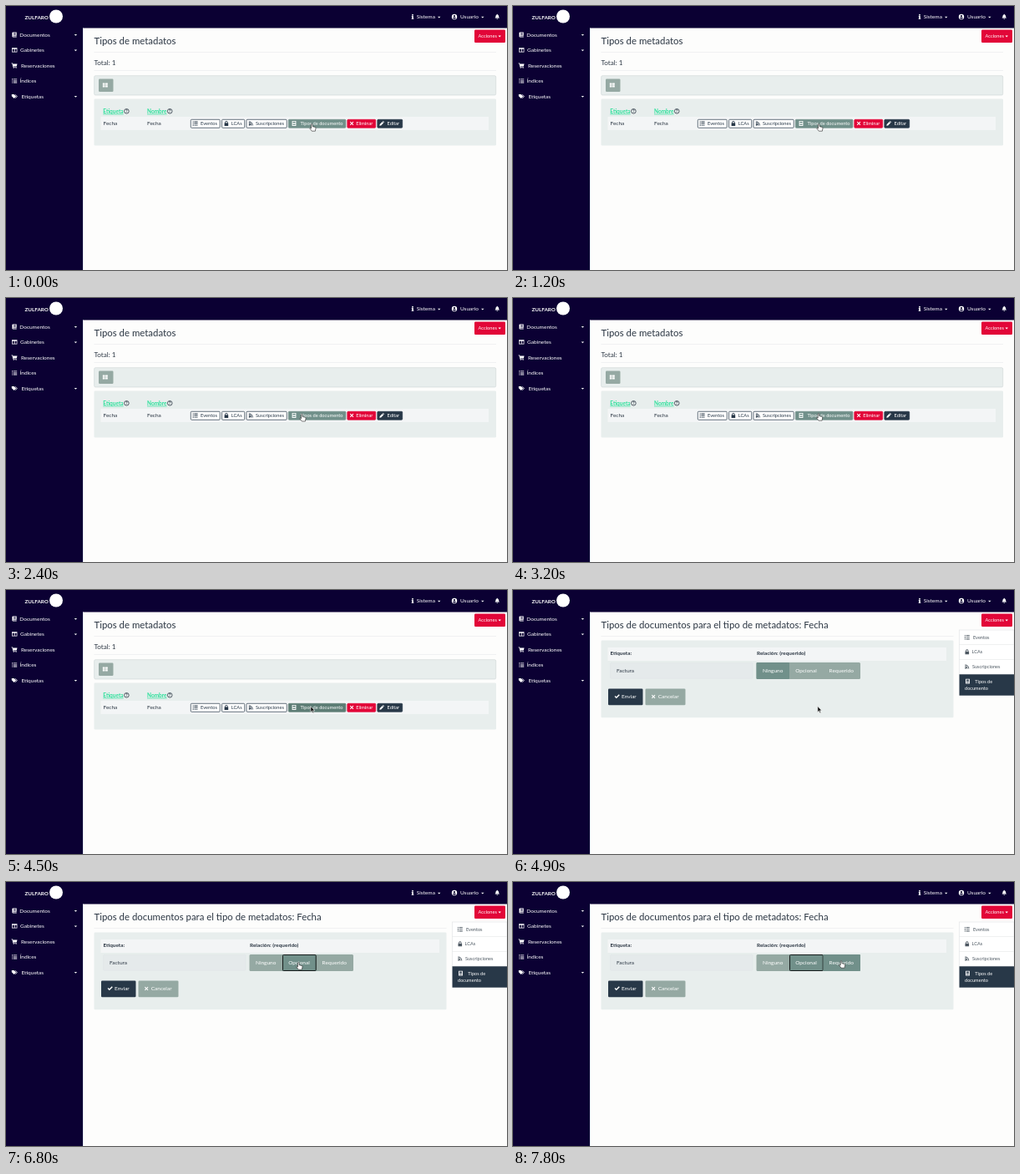
An HTML page for the animation above (8000 ms loop, 600 by 317 pixels).

```html
<!DOCTYPE html>
<html lang="es">
<head>
<meta charset="utf-8">
<style>
html, body { margin: 0; width: 100%; height: 100%; overflow: hidden; background: #fdfdfc; }
svg { display: block; width: 600px; height: 317px; font: 6.5px Lato, sans-serif; }
text { white-space: pre; }
</style>
</head>
<body>
<svg id="stage" viewBox="0 0 600 317"></svg>
<script>
const NAVY = '#0b0033', INK = '#2b3643', DARK = '#283848', RED = '#e20638',
  GREY = '#95a9a3', HOVER = '#71908a', PRESSED = '#5d7d75',
  PANEL = '#e8eeed', STRIP = '#f3f5f6', GREEN = '#2be09a';

// Icon paths are centred on 0,0 and about 6 px wide.
const icons = {
  list: 'M-3-2.6h1.1v1.1h-1.1zM-3-.5h1.1v1.1h-1.1zM-3 1.6h1.1v1.1h-1.1zM-1.2-2.5h4.2v.9h-4.2zM-1.2-.4h4.2v.9h-4.2zM-1.2 1.7h4.2v.9h-4.2z',
  lock: 'M-2.3-.4h.6v-1a1.7 1.7 0 0 1 3.4 0v1h.6v3.3h-4.6zM-.8-.4h1.6v-1a.8.8 0 0 0-1.6 0z',
  rss: 'M-2.5 1.7a.8.8 0 1 1 0 .1zM-2.5-.7a3.2 3.2 0 0 1 3.2 3.2h-.9a2.3 2.3 0 0 0-2.3-2.3zM-2.5-2.5a5 5 0 0 1 5 5h-.9a4.1 4.1 0 0 0-4.1-4.1z',
  doc: 'M-2.4-2.9h4.8v5.8h-4.8zM-1.5-2.2v1.2h3v-1.2zM-1.5-.4v.7h3v-.7zM-1.5 1v.9h3v-.9z',
  cross: 'M-2.2-1.4l.8-.8L0-.8l1.4-1.4.8.8L.8 0l1.4 1.4-.8.8L0 .8l-1.4 1.4-.8-.8L-.8 0z',
  pencil: 'M-2.8 2.8l.4-1.8 3-3 1.4 1.4-3 3zM1-2.3l.6-.6 1.4 1.4-.6.6z',
  check: 'M-3.1.2l1-1 1.2 1.2 3-3 1 1-4 4z',
  book: 'M-2.1-3h4.6v4.4h-4.2v.7h4.2v.9h-4.6a.7.7 0 0 1-.7-.8v-4.4a.8.8 0 0 1 .7-.8zM-1.2-1.8v.6h2.8v-.6zM-1.2-.6v.6h2.8v-.6z',
  columns: 'M-3.2-2.6h6.4v5.2h-6.4zM-2.5-1.2v3h2.1v-3zM.4-1.2v3h2.1v-3z',
  cart: 'M-3.6-2.8h1.4l.3.8h5.2l-.8 3h-3.7l.1.5h3.5v.6h-4.2l-1-4.2h-.8zM-1.6 2.4a.7.7 0 1 1 0 .1zM1.2 2.4a.7.7 0 1 1 0 .1z',
  tags: 'M-3.4-2.5h2.6l2.8 2.7-2.5 2.5-2.9-2.8zM.2-2.5h.6l2.8 2.7-2.5 2.5-.4-.4 2-2.1z',
  info: 'M-.9-2.3a.9.9 0 1 1 0 .1zM-1.2-1h2v2.7h.5v1h-2.6v-1h.5v-1.7h-.4z',
  user: 'M-3.2 0a3.2 3.2 0 1 1 6.4 0a3.2 3.2 0 1 1-6.4 0zM-1.2-.9a1.2 1.2 0 1 0 2.4 0a1.2 1.2 0 1 0-2.4 0zM-2 1.6a2.6 2.6 0 0 0 4 0q-.4-.9-1.2-.9h-1.6q-.8 0-1.2.9z',
  bell: 'M-2.7 1.7q.9-.8.9-2.4 0-1.4 1.4-1.8v-.5h.8v.5q1.4.4 1.4 1.8 0 1.6.9 2.4zM-.8 2.1h1.6q0 .8-.8.8t-.8-.8z',
  caret: 'M-1.7-.8h3.4l-1.7 1.8z',
  grid: 'M-3-2.5h2.7v2.2h-2.7zM.3-2.5h2.7v2.2h-2.7zM-3 .3h2.7v2.2h-2.7zM.3.3h2.7v2.2h-2.7z'
};

const icon = (name, x, y, fill = '#fff') =>
  `<path d="${icons[name]}" transform="translate(${x} ${y})" fill="${fill}" fill-rule="evenodd"/>`;
const text = (s, x, y, fill = INK, size = 6.5, extra = '') =>
  `<text x="${x}" y="${y}" fill="${fill}" font-size="${size}" ${extra}>${s}</text>`;
const box = (x, y, x2, y2, fill, extra = '') =>
  `<rect x="${x}" y="${y}" width="${x2 - x}" height="${y2 - y}" fill="${fill}" ${extra}/>`;
const rule = (y, x2) => box(105.5, y, x2, y + .5, '#e3e5e6');
const bold = 'font-weight="700"';

function frameBars() {
  const menu = [['Documentos', 'book', 16.3, 1], ['Gabinetes', 'columns', 17, 1],
    ['Reservaciones', 'cart', 18, 0], ['Índices', 'list', 16.5, 0], ['Etiquetas', 'tags', 18.5, 1]];
  return box(0, 0, 600, 26.5, NAVY) + box(0, 0, 92, 317, NAVY) + box(92, 26.5, 92.7, 317, '#d5e3ea') +
    text('ZULFARO', 22.5, 15.5, '#fff', 6.3, bold) + '<circle cx="60" cy="12.5" r="8" fill="#fff"/>' +
    menu.map(([label, pic, x, open], i) => {
      const y = 34.4 + 18.5 * i;
      return icon(pic, 10.2, y) + text(label, x, y + 2.3, '#fff') + (open ? icon('caret', 83.4, y + .3) : '');
    }).join('') +
    icon('info', 487, 13) + text('Sistema', 491.7, 15.3, '#fff') + icon('caret', 518.7, 13.5) +
    icon('user', 537, 13) + text('Usuario', 544, 15.3, '#fff') + icon('caret', 570.8, 13.5) +
    icon('bell', 588.3, 12.8) +
    box(561, 28.5, 598, 44, RED, 'rx="1.2"') + text('Acciones', 565.5, 38, '#fff', 5.69) + icon('caret', 591.2, 36.4);
}

function columnLink(label, x, cx) {
  return text(label, x, 128.7, GREEN, 6.5, bold + ' text-decoration="underline"') +
    `<circle cx="${cx}" cy="126.3" r="2.8" fill="none" stroke="${INK}" stroke-width=".8"/>` +
    text('?', cx, 128.2, INK, 5, bold + ' text-anchor="middle"');
}

function rowButton(label, pic, x, x2, tx, fill, ink) {
  const edge = fill === '#fff' ? DARK : fill;
  return box(x + .3, 136.3, x2 - .3, 146.3, fill, `rx="1" stroke="${edge}" stroke-width=".7"`) +
    icon(pic, x + (pic === 'doc' ? 7 : 5.6), 141, ink) + text(label, tx, 143.1, ink, 5.69);
}

function listPage(tone) {
  return text('Tipos de metadatos', 105.5, 45.7, INK, 11.4) + rule(55, 587) +
    text('Total: 1', 105.5, 71.3, INK, 8.12) + rule(77, 587) +
    box(105.7, 83.7, 586.7, 107, PANEL, 'rx="1.5" stroke="#cbd4d4" stroke-width=".6"') +
    box(111, 87.5, 128.5, 103, GREY, 'rx="1.2"') + icon('grid', 118.8, 95) +
    box(105.5, 111.5, 587, 167.5, PANEL, 'rx="1.2"') + box(113.5, 133, 578, 149, STRIP) +
    columnLink('Etiqueta', 116.3, 144.4) + columnLink('Nombre', 169, 196.2) +
    text('Fecha', 116.5, 142.6) + text('Fecha', 169, 142.6) +
    rowButton('Eventos', 'list', 221, 256.5, 233, '#fff', DARK) +
    rowButton('LCAs', 'lock', 258.3, 286, 269.8, '#fff', DARK) +
    rowButton('Suscripciones', 'rss', 287.7, 336.5, 299, '#fff', DARK) +
    rowButton('Tipos de documento', 'doc', 338, 407.2, 352.5, tone, tone === '#fff' ? DARK : '#fff') +
    rowButton('Eliminar', 'cross', 408.5, 443, 419.3, RED, '#fff') +
    rowButton('Editar', 'pencil', 444.5, 475, 456.5, DARK, '#fff');
}

const options = [['Ninguno', 291.5, 331, 299], ['Opcional', 331, 371.5, 338.2], ['Requerido', 371.5, 416, 378.6]];

function formPage(chosen, focused, hovered) {
  const side = [['Eventos', 'list', 551], ['LCAs', 'lock', 549.5], ['Suscripciones', 'rss', 550]];
  return text('Tipos de documentos para el tipo de metadatos: Fecha', 105.5, 45.7, INK, 11.4) + rule(55, 527.5) +
    box(105.5, 60.5, 527.5, 153.3, PANEL, 'rx="1.2"') + box(113.5, 69, 519, 85, STRIP) +
    text('Etiqueta:', 116.5, 78, INK, 6.4, bold) + text('Relación: (requerido)', 292, 78, INK, 6.4, bold) +
    box(116.7, 87.2, 287, 106.3, '#e5eaeb', 'rx="1.2" stroke="#dde3e5" stroke-width=".5"') +
    text('Factura', 124, 98.9) +
    box(291.5, 87, 416, 107, GREY, 'rx="1.5"') +
    options.map(([label, x, x2, tx], i) =>
      (i === chosen || i === hovered ? box(x, 87, x2, 107, HOVER, 'rx="1"') : '') +
      (i === focused ? box(x + .5, 87.5, x2 - .3, 106.5, 'none', 'rx="1" stroke="#151b1b" stroke-width="1"') : '') +
      text(label, tx, 99, '#fff')).join('') +
    box(114, 118.5, 155.5, 138.2, DARK, 'rx="1.3"') + icon('check', 124.7, 127.8) + text('Enviar', 130, 130.3, '#fff') +
    box(158.5, 118.5, 206.5, 138.2, GREY, 'rx="1.3"') + icon('cross', 168.2, 128) + text('Cancelar', 173.7, 130.3, '#fff') +
    box(534.5, 48, 600, 101.5, '#fff', 'stroke="#dfe2e3" stroke-width=".6"') +
    side.map(([label, pic, x], i) => {
      const y = 56.8 + 17.6 * i;
      return icon(pic, 543.8, y, '#4c5761') + text(label, x, y + 2, '#4c5761', 5.6) +
        (i ? box(534.5, y - 9, 600, y - 8.5, '#dfe2e3') : '');
    }).join('') +
    box(534.5, 101.3, 600, 126.7, DARK) + icon('doc', 544.5, 109.7) +
    text('Tipos de', 553.3, 111.8, '#fff', 5.6) + text('documento', 541, 119.6, '#fff', 5.6);
}

function cursor(x, y, hand) {
  const d = hand
    ? 'M-.8.6q.8-1.2 1.6 0v2.6l3.1.7q.9.3.8 1.3l-.6 3.5h-4.1l-2.6-3.4q.3-1 1.8.2z'
    : 'M0 0v7.2l1.6-1.5 1.2 2.6 1.2-.6-1.2-2.4h2.2z';
  return `<path d="${d}" transform="translate(${x} ${y})" fill="${hand ? '#fff' : '#111'}" stroke="${hand ? '#222' : '#fff'}" stroke-width=".6"/>`;
}

// time, x, y of the pointer tip
const track = [[0, 366.3, 141.5], [1300, 366.3, 141.5], [1400, 365, 146], [1600, 358, 198], [1800, 352, 155],
  [2200, 350, 139.5], [2800, 363, 139], [3000, 363, 139], [3200, 366, 138.5], [4400, 366, 138.5],
  [4500, 364.8, 139.5], [5400, 364.8, 139.5], [5900, 350.3, 96.5], [7400, 350.3, 96.5],
  [7600, 391, 95], [7700, 391, 95], [7800, 393, 94.5], [8000, 393, 94.5]];

function pointer(t) {
  const i = track.findIndex(k => k[0] > t);
  const [a, b] = [track[i - 1], track[i]];
  const u = (t - a[0]) / (b[0] - a[0]);
  return [a[1] + (b[1] - a[1]) * u, a[2] + (b[2] - a[2]) * u];
}

function scene(t) {
  const [x, y] = pointer(t);
  if (t < 4900) {
    const over = x > 338 && x < 407 && y > 136 && y < 147;
    const tone = !over ? '#fff' : t >= 4300 ? PRESSED : HOVER;
    return listPage(tone) + frameBars() + cursor(x, y, over && t < 4500);
  }
  const hovered = y > 107 ? -1 : options.findIndex(o => x >= o[1] && x < o[2]);
  return formPage(t < 6800 ? 0 : 1, t < 6600 ? -1 : 1, hovered) + frameBars() + cursor(x, y, hovered >= 0);
}

const stage = document.getElementById('stage');
let shown = -1;
function tick() {
  const t = Math.floor(performance.now() % 8000 / 100) * 100;
  if (t !== shown) stage.innerHTML = scene(shown = t);
  requestAnimationFrame(tick);
}
tick();
</script>
</body>
</html>
```
